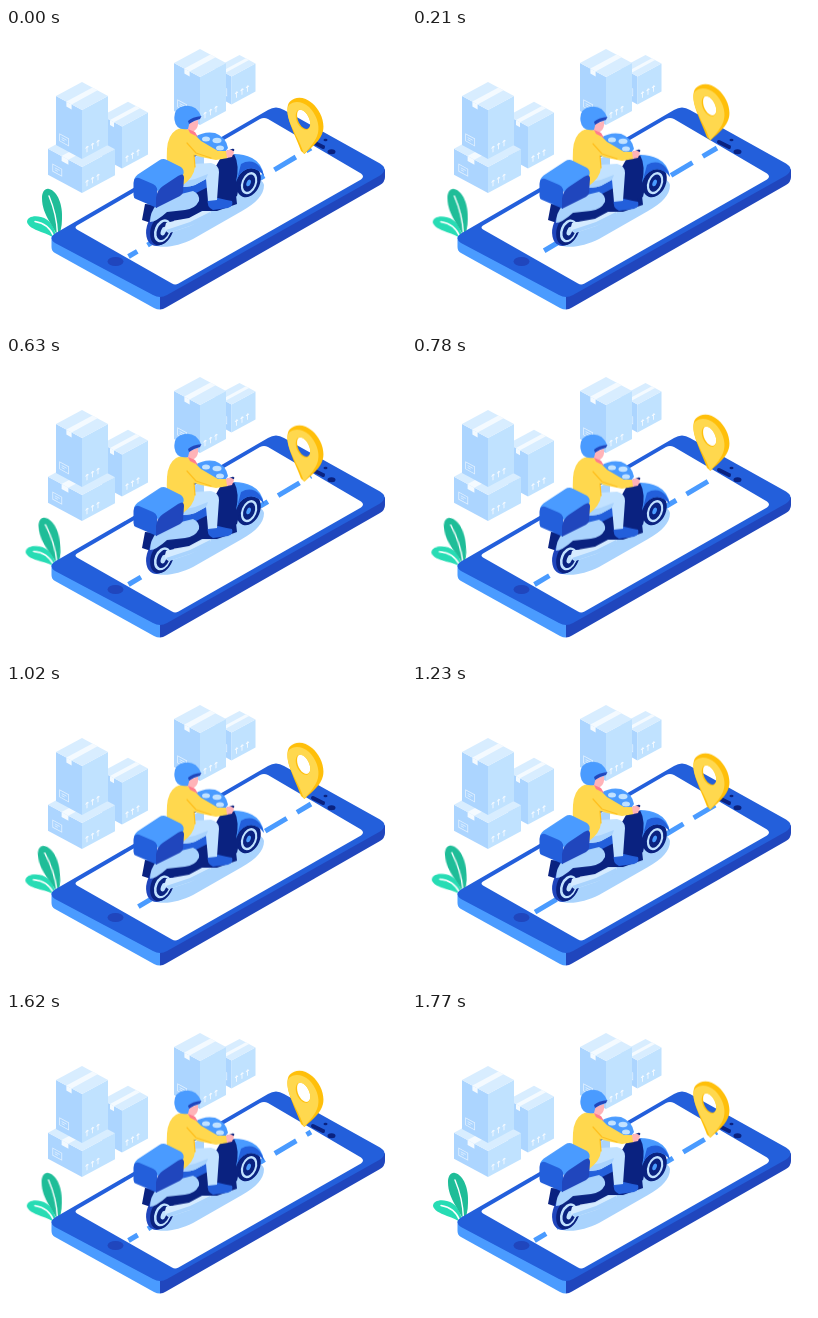
Recreate the animation shown at these times as an HTML page. Size 400 by 300 pixels, loop 1800 ms.

```html
<!DOCTYPE html>
<html lang="en">
<head>
<meta charset="utf-8">
<title>Delivery</title>
<style>
  html, body { margin: 0; width: 100%; height: 100%; overflow: hidden; background: #fff; }
  svg { display: block; width: 400px; height: 300px; }

  .pin { animation: bob 300ms cubic-bezier(.37, 0, .63, 1) infinite alternate; }
  .ride { animation: bounce 300ms cubic-bezier(.37, 0, .63, 1) infinite alternate; }
  .leaf { transform-origin: 51px 211px; animation: sway 900ms cubic-bezier(.37, 0, .63, 1) infinite alternate; }
  .road {
    fill: none; stroke: #4a9bff; stroke-width: 5;
    stroke-dasharray: 25 11.9;
    animation: drive 1800ms steps(60) infinite;
  }
  @keyframes bob { to { transform: translateY(-17px); } }
  @keyframes bounce { to { transform: translateY(1px); } }
  @keyframes sway { to { transform: rotate(-6deg); } }
  @keyframes drive { from { stroke-dashoffset: 14.8; } to { stroke-dashoffset: 424.2; } }

  .navy { fill: #0a2280; }
  .deep { fill: #2046bd; }
  .blue { fill: #235fdb; }
  .sky { fill: #4a9bff; }
  .pale { fill: #a9d3fd; }
  .ice { fill: #c2e2ff; }
  .white { fill: #fff; }
  .skin { fill: #ffb3b8; }
  .yellow { fill: #ffd84e; }
  .line { fill: none; stroke-linecap: round; stroke-linejoin: round; }
</style>
</head>
<body>
<svg viewBox="0 0 400 300" xmlns="http://www.w3.org/2000/svg">
  <g id="boxes"></g>

  <!-- plant -->
  <g class="leaf">
    <path fill="#27dcb4" d="M50 212C46 208 41 206 35 204C27 201 22 198 21 194C21 189 28 187 35 189C44 191 50 200 50 212Z"/>
    <path class="line" stroke="#fff" stroke-width="1.400" d="M29 193.500C39 195 45 201 48 209"/>
    <path fill="#1fbd98" d="M52 211C49 198 36 188 36 170C36 164 39 160 43 161C52 163 57 178 56 191C56 199 54 205 52 211Z"/>
    <path class="line" stroke="#fff" stroke-width="1.400" d="M43 168C48 180 51 192 51.500 206"/>
  </g>

  <!-- phone -->
  <path class="sky" d="M45.500 209V219Q45.500 223 49 225L148 280Q151 281.500 154 281.500V262Z"/>
  <path class="deep" d="M379 141V149Q379 154 374 157L160 279.500Q157 281.500 154 281.500V262Z"/>
  <path class="blue" d="M49 205.500L262 82Q270 77 278 82L374 135.500Q383 141 374 147.500L161 267Q154 271 147 267L49 215Q42 210 49 205.500Z"/>
  <path class="white" d="M71 197.500L254 91Q258 89 262 91L355 145.500Q359 148.500 355 151.500L172.500 255.500Q169 257.500 166 255.500L71 201.500Q68 199.500 71 197.500Z"/>
  <ellipse class="deep" cx="109.500" cy="233.500" rx="8" ry="4.500"/>
  <path class="line" stroke="#0a2280" stroke-width="4" d="M307 114L317 119"/>
  <ellipse class="navy" cx="319.500" cy="112" rx="2" ry="1.300"/>
  <ellipse class="navy" cx="325.500" cy="123.800" rx="4" ry="2.500"/>

  <path class="road" d="M122.500 228.500L305 120"/>

  <!-- scooter shadow -->
  <path class="pale" d="M146 217C158 221 173 218 187 211L236 183C250 175 258 167 258 157C257 150 247 149 239 154L161 199C151 205 143 212 146 217Z"/>

  <!-- front wheel -->
  <g transform="rotate(22 243 154)">
    <ellipse class="navy" cx="242.500" cy="154" rx="11.500" ry="16"/>
    <ellipse class="ice" cx="243.500" cy="155" rx="7.500" ry="11.500"/>
    <ellipse class="navy" cx="243.500" cy="155" rx="5.500" ry="9"/>
    <ellipse class="sky" cx="243" cy="155" rx="2" ry="3.500"/>
  </g>

  <!-- rear wheel -->
  <path class="navy" d="M139 176L153 177L148 196L136 192Z"/>
  <g transform="rotate(22 155 200)">
    <ellipse class="deep" cx="154" cy="200" rx="13" ry="19"/>
    <ellipse class="navy" cx="156.500" cy="201" rx="11" ry="16.500"/>
    <ellipse class="ice" cx="157.500" cy="202" rx="8" ry="12"/>
    <ellipse class="navy" cx="158" cy="202" rx="6" ry="9.500"/>
    <ellipse class="ice" cx="158.500" cy="202" rx="2.500" ry="4.500"/>
  </g>

  <path fill="#d5ebff" d="M160 195L180 190L202 181Q207 183 203 188L184 198L163 205Q157 203 160 195Z"/>
  <path class="pale" d="M160 202L184 194L204 184Q206 187 202 190L184 198L163 205Z"/>

  <g class="ride">
    <!-- chassis -->
    <path class="navy" d="M150 173L175 161L204 150L212 166L230 167L231 176L211 183L196 183L183 190L166 193L150 187Z"/>
    <path class="blue" d="M175 160L201 149Q207 152 204 158L190 165L175 167Z"/>
    <path class="pale" d="M151 176Q154 170 163 169L187 163Q194 166 193 173Q189 181 179 182L161 184Q150 194 144 194Q144 184 151 176Z"/>

    <!-- front shield and fender -->
    <path class="navy" d="M202 152L214 131L229 126L241 135L235 150L231 168L219 175L205 169Z"/>
    <path class="sky" d="M228 126Q238 126 246 130Q256 135 258 148Q250 138 241 141Q233 144 230 154Q234 137 228 126Z"/>
    <path class="blue" d="M235 136Q246 130 254 139Q257 143 258 148Q250 138 241 141Q235 143 231 151Z"/>

    <!-- dashboard -->
    <path class="pale" d="M187 130L198 125V140H187Z"/>
    <path class="sky" d="M189 109Q198 103 209 105Q220 109 222 120L217 127L204 125L193 117Z"/>
    <ellipse class="ice" cx="200" cy="111" rx="4" ry="2.500"/>
    <ellipse class="ice" cx="211" cy="112.500" rx="4.500" ry="2.800"/>
    <ellipse class="ice" cx="214" cy="120" rx="4" ry="2.500"/>
    <path class="line" stroke="#0a2280" stroke-width="2.500" d="M219 125L227 122"/>

    <!-- rider -->
    <path class="blue" d="M202 170L212 170Q220 172 226 173Q228 178 222 180L207 182Q200 179 202 170Z"/>
    <path class="ice" d="M175 150L187 136L205 135Q213 137 213 144L211 172L202 173L200 151L189 157Q181 160 175 158Z"/>
    <path class="pale" d="M175 154L189 151L202 146L200 151L189 157Q181 160 175 158Z"/>
    <path class="skin" d="M179 97L192 92Q193 100 188 103L186 107L177 104Z"/>
    <path class="yellow" d="M170 102Q178 98 187 105L195 113L212 123L221 123L222 130L210 132L195 129L188 127L189 139Q188 149 177 157L163 151Q160 138 161 121Q162 107 170 102Z"/>
    <path class="line" stroke="#ffc01e" stroke-width="1.200" d="M181 115L190 125L205 130M188 127L189 139"/>
    <path fill="#ff7c8d" d="M182 101L189 104L192 109L184 105Z"/>
    <path class="skin" d="M220 123Q225 120 228 124L226 129L221 130Z"/>
    <path class="sky" d="M168.500 92Q167 80 178.500 78Q190 76 195 88L184 93L182 101Q170 103 168.500 92Z"/>
    <path class="deep" d="M182 93Q186 89 195.500 88L194 91Q189 92 183 96Z"/>

    <!-- cargo case -->
    <path class="sky" d="M128 152Q129 148 134 145L153 132.500Q157 130 161 132L175 139Q179 142 177 147L153 163L128 156Z"/>
    <path class="blue" d="M127.500 155Q128 149 133 150L147 156Q153 159 151 167V180L130 171Q127.500 170 127.500 167Z"/>
    <path class="deep" d="M150 180V170Q151 162 157 158L172 148Q178 144 178 150L177 164Q177 166 174 168Z"/>
  </g>

  <!-- map pin -->
  <g class="pin">
    <path fill="#ffbf0a" fill-rule="evenodd" d="M284 73.500C289 68.500 298 68 306 75C314 82 319 93 317 103C315 112 306 119 298.500 126L295 123C291 112 284 98 282 88C281 82 281 76.500 284 73.500ZM291.500 84C289.500 91 295 101 301 101C307 99 304 89 299 84C296 81 292.500 81 291.500 84Z"/>
    <path class="yellow" fill-rule="evenodd" d="M283 77C288 72.500 296 73 303 79C310 86 314 96 312 105C310 113 304 119 298 126C294 113 285 100 282.500 90C281 84 281 80 283 77ZM290.500 84C287.500 91 294 102 301 102C307 99 304 89 299 84C295 81 292 81 290.500 84Z"/>
  </g>
</svg>

<script>
  const K = 0.54; // vertical drop per horizontal pixel
  const [top_, left_, right_, tape] = ['#d8edff', '#acd5ff', '#c0e2ff', '#f4faff'];

  // Cardboard box; (x, y) is the front corner of its lid.
  function box(x, y, a, b, h) {
    const at = (u, v) => `${x - u + v},${y - K * (u + v)}`;
    const quad = (u0, u1, fill) =>
      `<polygon fill="${fill}" points="${at(u0, 0)} ${at(u0, b)} ${at(u1, b)} ${at(u1, 0)}"/>`;
    const arrow = (px, py) => `M${px} ${py + 7}v-6m-1.500 1.500l1.500-1.500l1.500 1.500`;
    const row = h - 13;
    return `
      <g transform="matrix(1 ${K} 0 1 ${x} ${y})">
        <rect x="${-a}" width="${a}" height="${h}" fill="${left_}"/>
        <rect x="${-a * .6}" width="${a * .2}" height="5" fill="${tape}"/>
        <rect x="${-a * .86}" y="${row}" width="9" height="7" fill="none" stroke="#e3f1ff" stroke-width=".8"/>
        <path d="M${-a * .86 + 2} ${row + 2.5}h5m-5 2h3" stroke="#e3f1ff" stroke-width=".7"/>
      </g>
      <g transform="matrix(1 ${-K} 0 1 ${x} ${y})">
        <rect width="${b}" height="${h}" fill="${right_}"/>
        <path d="${[5, 10.5, 16].map(px => arrow(px, row + 2)).join('')}" fill="none" stroke="#f3f9ff" stroke-width=".9"/>
      </g>
      ${quad(0, a, top_)}${quad(a * .4, a * .6, tape)}`;
  }

  document.getElementById('boxes').innerHTML =
    box(116, 98.5, 20, 26, 42) +
    box(76, 139, 34, 33, 26) +
    box(76, 82, 26, 26, 49) +
    box(225.5, 48.5, 16, 24, 28) +
    box(194, 49, 26, 26, 48);
</script>
</body>
</html>
```
